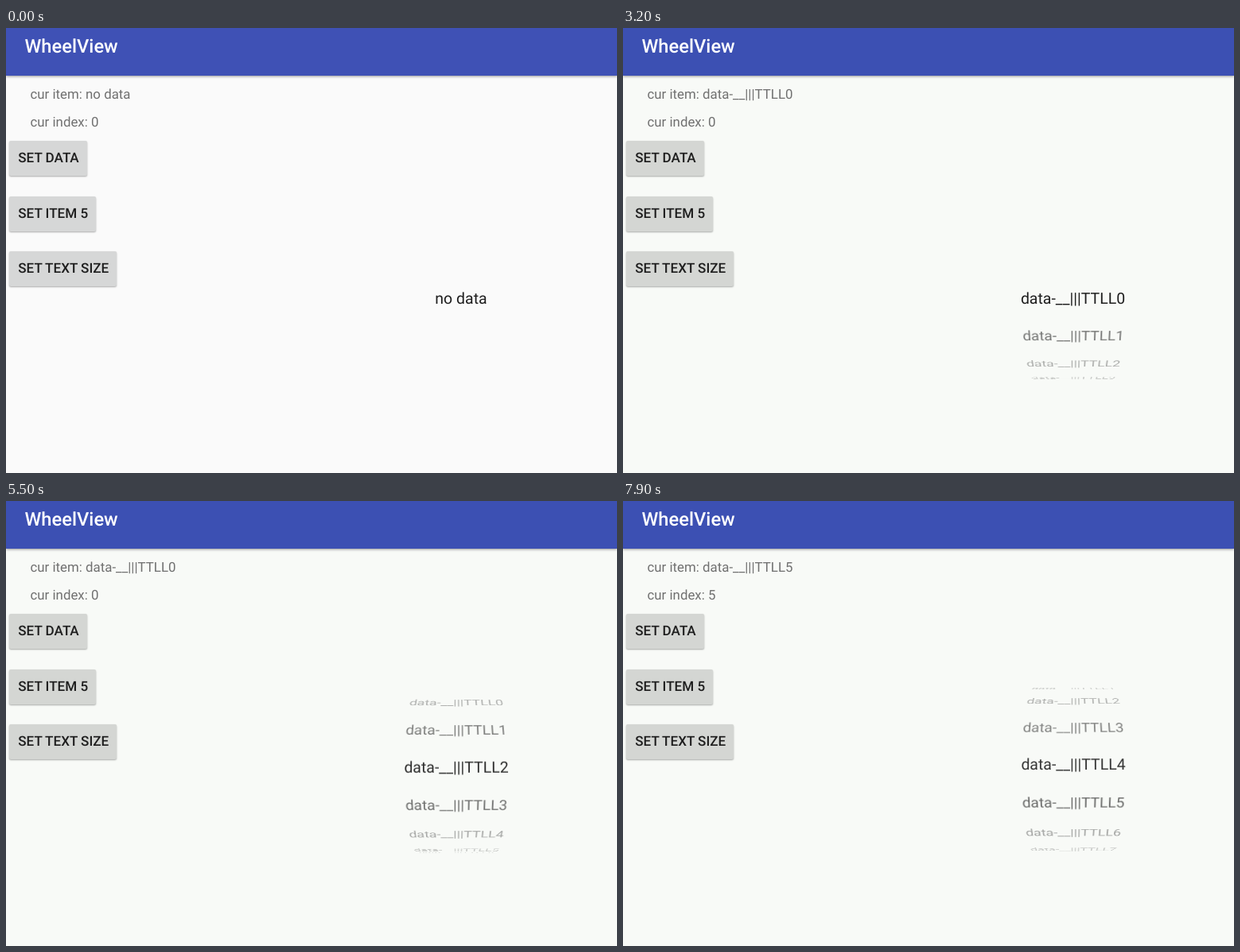
An HTML page for the animation above (8 s loop, 768 by 560 pixels).

```html
<!DOCTYPE html>
<html lang="en">
<head>
<meta charset="utf-8">
<title>WheelView</title>
<style>
  html, body { margin: 0; width: 100%; height: 100%; overflow: hidden; }
  body { position: relative; background: #fafafa; font-family: Roboto, sans-serif;
    text-rendering: geometricPrecision; }
  body.late { background: #f8faf7; }
  body > *, #wheel > * { position: absolute; white-space: pre; }
  #bar { left: 0; top: 0; width: 768px; height: 60px; background: #3f51b5;
    box-shadow: 0 1px 3px rgba(0, 0, 0, .4); }
  .late #bar { background: #3c50b3; }
  h1 { left: 23.5px; top: 8px; margin: 0; font: 500 23.7px/30px Roboto, sans-serif; color: #fff; }
  .label { left: 30.5px; font-size: 16.85px; line-height: 24px; color: #707070; }
  .button { left: 4px; height: 44px; box-sizing: border-box; padding-left: 11.3px; border-radius: 2px;
    background: #d6d7d7; box-shadow: 0 1px 2px rgba(0, 0, 0, .32);
    font-size: 17.1px; font-weight: 500; line-height: 45.5px; color: #1e1e1e; }
  .late .button { background: #d4d6d3; }
  #wheel { left: 0; top: 338px; }
  #wheel div { width: 200px; height: 24px; margin: -14.5px 0 0 -100px; padding-top: 5px;
    font-size: 19.5px; line-height: 24px; text-align: center; color: #1e1e1e; }
  #touch { width: 25px; height: 25px; margin: -14px 0 0 -14px; border: 1.5px solid #bdc0e8; border-radius: 50%; }
</style>
</head>
<body>
<div id="bar"></div>
<h1>WheelView</h1>
<div class="label" id="item" style="top:72px"></div>
<div class="label" id="index" style="top:107px"></div>
<div class="button" style="top:142px;width:98px">SET DATA</div>
<div class="button" style="top:212px;width:109px">SET ITEM 5</div>
<div class="button" style="top:281px;width:135px">SET TEXT SIZE</div>
<div id="wheel"></div>
<div id="touch"></div>
<script>
const LOOP = 8000, STEP = 100;
const RADIUS = 148, DEPTH = 296, ANGLE = 19.2, ROW = 50;
const DATA_AT = 2800, ROLL_AT = 4700, SETTLED_AT = 6600, DRAG_AT = 6800;
const OVERSCROLL = 4, SPRING = 400;

const press = (at, hold, x, y) => ({ at, hold, x, y });
const pulls = [press(400, 400, 745, 285), press(1300, 700, 745, 285),
               press(3400, 100, 725, 285), press(3900, 300, 725, 285)];
const touches = [...pulls,
  press(2700, 100, 84, 166),
  press(ROLL_AT, 300, 703, 511),
  press(6700, 500, 725, 419 + 5 * ROW)];

const $ = id => document.getElementById(id);
const clamp = v => Math.min(1, Math.max(0, v));
const dataName = i => "data-__|||TTLL" + i;

// Wheel position in items: pulls go past the top and spring back,
// then a steady roll to item 5 and a slow drag back.
function position(t) {
  const roll = 5 * clamp((t - ROLL_AT) / (SETTLED_AT - ROLL_AT));
  const back = .82 * (1 - Math.pow(1 - clamp((t - DRAG_AT) / 1100), 1.3));
  const over = pulls.reduce((sum, { at, hold }) =>
    sum + clamp(Math.min((t - at) / hold, (at + hold + SPRING - t) / SPRING)), 0);
  return roll - back - OVERSCROLL * over;
}

function addItem(text, index, x) {
  const el = document.createElement("div");
  el.textContent = text;
  el.style.left = x + "px";
  $("wheel").append(el);
  return { el, index };
}

const empty = [addItem("no data", 0, 572)];
const full = Array.from({ length: 10 }, (_, i) => addItem(dataName(i), i, 565.5));

function turn(items, pos, shown) {
  for (const { el, index } of items) {
    const off = index - pos, far = Math.abs(off);
    el.style.display = shown && far < 3.95 ? "" : "none";
    el.style.opacity = Math.pow(.6, far);
    el.style.transform = far < .001 ? "none" :
      `perspective(${DEPTH}px) translateZ(${-RADIUS}px) rotateX(${-off * ANGLE}deg) translateZ(${RADIUS}px)`;
  }
}

function draw(now) {
  const t = Math.floor(now % LOOP / STEP) * STEP;
  const loaded = t >= DATA_AT;
  const current = t >= SETTLED_AT ? 5 : 0;
  const pos = position(t);

  document.body.classList.toggle("late", t >= 400);
  $("item").textContent = "cur item: " + (loaded ? dataName(current) : "no data");
  $("index").textContent = "cur index: " + current;
  turn(empty, pos, !loaded);
  turn(full, pos, loaded);

  // The finger moves with the wheel.
  const touch = touches.find(({ at, hold }) => t >= at && t <= at + hold);
  $("touch").style.display = touch ? "" : "none";
  if (touch) {
    $("touch").style.left = touch.x + "px";
    $("touch").style.top = touch.y - pos * ROW + "px";
  }
}

const start = performance.now();
function tick() {
  draw(performance.now() - start);
  requestAnimationFrame(tick);
}
tick();
</script>
</body>
</html>
```
